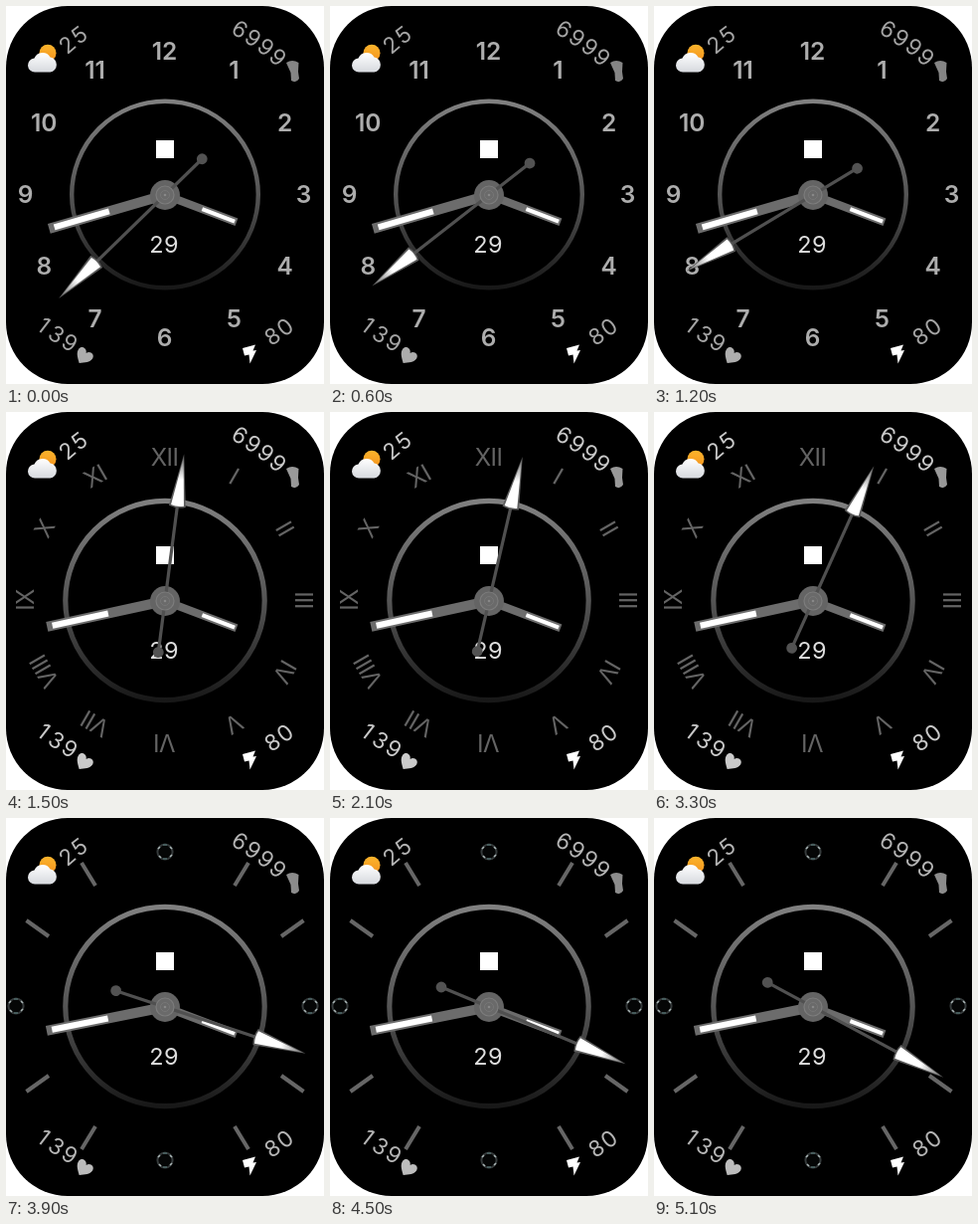
An HTML page for the animation above (5400 ms loop, 320x380 px).

```html
<!DOCTYPE html>
<html lang="en">
<head>
<meta charset="utf-8">
<title>Watch face</title>
<style>
html, body { margin: 0; width: 100%; height: 100%; overflow: hidden; background: #fff; }
svg { display: block; width: 100vw; height: 100vh; }
text { font-family: Inter, Roboto, sans-serif; text-anchor: middle; }
.arabic { font-size: 24.5px; font-weight: 600; fill: #adadad; }
.roman { font-size: 24px; font-weight: 400; fill: #646464; letter-spacing: -.6px; }
.thin { font-size: 22.5px; font-weight: 400; }
.date { font-size: 23.5px; font-weight: 400; fill: #dedede; letter-spacing: .5px; }
</style>
</head>
<body>
<svg viewBox="0 0 320 380">
  <defs>
    <linearGradient id="ringFade" x1="0" y1="0" x2="0" y2="1">
      <stop offset="0" stop-color="#808080"/>
      <stop offset=".5" stop-color="#555"/>
      <stop offset="1" stop-color="#181818"/>
    </linearGradient>
    <linearGradient id="cloud" x1="0" y1="0" x2="0" y2="1">
      <stop offset="0" stop-color="#fff"/>
      <stop offset="1" stop-color="#d6d9de"/>
    </linearGradient>
    <linearGradient id="sun" x1="0" y1="0" x2="0" y2="1">
      <stop offset="0" stop-color="#fbb52c"/>
      <stop offset="1" stop-color="#f3921e"/>
    </linearGradient>
    <linearGradient id="tip" x1="0" y1="0" x2="0" y2="1">
      <stop offset="0" stop-color="#777"/>
      <stop offset=".45" stop-color="#fff"/>
    </linearGradient>
    <g id="gem">
      <circle r="7.6" fill="#050606" stroke="#353a3b" stroke-width="2"/>
      <path d="M-7 -3l2 -2M5 -5l2 2M-6 4l2 2M5 5l2 -2" stroke="#a9b4b4" stroke-width="1.6"/>
      <path d="M-2 -7h4M-2 7h4" stroke="#4f6a6a" stroke-width="1.4"/>
    </g>
  </defs>

  <rect width="320" height="380" fill="#fff"/>
  <rect width="320" height="380" rx="62" fill="#000"/>

  <circle id="ring" cx="160" cy="189.500" fill="none" stroke="url(#ringFade)"/>
  <g id="dials"></g>

  <g id="corners"></g>
  <g>
    <circle cx="42" cy="47.300" r="8.500" fill="url(#sun)"/>
    <path d="M29.500 66.500a7 7 0 0 1-1-14a9 9 0 0 1 16-1a7.600 7.600 0 0 1 0 15z" fill="url(#cloud)"/>
  </g>
  <path id="foot" d="M282 57Q288 53 294.500 57L294 66L295 73Q292 78 287 75L286.500 67Z"/>
  <path id="heart" transform="translate(78.500 352) rotate(35) scale(.94)" d="M0 9C-5 5-9 2-9-3C-9-8-2-9 0-4C2-9 9-8 9-3C9 2 5 5 0 9Z"/>
  <path d="M238 344L251 340.500L248.500 346.500L252 346L245.500 359.500L244.500 350.500L240 351.500Z" fill="#fff"/>

  <rect x="151" y="135" width="18" height="18" fill="#fff"/>
  <text class="date" x="159.200" y="247.500">29</text>

  <g id="hour" transform="translate(160 190) rotate(110.800)">
    <rect x="-4" y="-77" width="8" height="77" fill="#6c6c6c"/>
    <rect x="-2" y="-75" width="4" height="35" fill="#fff"/>
  </g>
  <g id="minute">
    <rect x="-5" y="-121.500" width="10" height="121.500" fill="#6c6c6c"/>
    <rect x="-3" y="-116" width="6" height="57.500" fill="#fff"/>
  </g>
  <circle cx="160" cy="190" r="15" fill="#646464"/>
  <g id="second">
    <path d="M0 -98V52" stroke="#505050" stroke-width="3.200"/>
    <circle cy="52" r="5.400" fill="#525252"/>
    <path d="M0 -149L8.500 -96Q0 -93 -8.500 -96Z" fill="#5c5c5c"/>
    <path d="M0 -145L6.500 -97Q0 -95 -6.500 -97Z" fill="url(#tip)"/>
  </g>
  <g transform="translate(160 190)" fill="none">
    <circle r="9" fill="#6a6a6a" stroke="#7d7d7d" stroke-width="1.200"/>
    <circle r="4.500" stroke="#777"/>
    <circle r="1.300" fill="#888"/>
  </g>
</svg>
<script>
const STEP = 300, LOOP = 5400;
const $ = id => document.getElementById(id);
const at = (x, y, turn) => `translate(${x} ${y}) rotate(${turn})`;

// Each style: first step, ring, minute hand, corner shades, second-hand angle per step
const styles = [
  { from: 0, radius: 93.8, line: 4.4, minute: 253.8, text: '#a4a4a4', heart: '#adadad', foot: '#858585',
    seconds: [225.8, 229, 232.1, 235.6, 239] },
  { from: 5, radius: 100.2, line: 5.2, minute: 257.7, text: '#c8c8c8', heart: '#cacaca', foot: '#999',
    seconds: [7.4, 10.2, 13.1, 15.8, 18.6, 21.5, 24.3] },
  { from: 12, radius: 100.2, line: 5.2, minute: 258.7, text: '#b4b4b4', heart: '#bcbcbc', foot: '#8c8c8c',
    seconds: [106, 108.3, 110.5, 112.6, 115.5, 118.3] }
];

const romans = 'I II III IV V VI VII VIII IX X XI XII'.split(' ');

function numerals(kind, label, turns) {
  return romans.map((_, i) => {
    const a = (i + 1) * Math.PI / 6;
    const x = 159.5 + 140 * Math.sin(a), y = 189 - 144 * Math.cos(a);
    return `<text class="${kind}" y="8.8" transform="${at(x, y, turns ? (i + 1) * 30 : 0)}">${label(i)}</text>`;
  }).join('');
}

function bars() {
  const quarter = '<path d="M70 -121L84 -144M117 -70L139.5 -86"/>';
  const sides = [[1, 1], [-1, 1], [1, -1], [-1, -1]]
    .map(([x, y]) => `<g transform="translate(160 189) scale(${x} ${y})">${quarter}</g>`).join('');
  const gems = [[160, 34], [306, 189], [160, 344], [10, 189]]
    .map(([x, y]) => `<use href="#gem" x="${x}" y="${y}"/>`).join('');
  return `<g stroke="#666" stroke-width="4">${sides}</g>${gems}`;
}

// Digits spread along a shallow arc around (x, y)
function arcText(str, x, y, turn, bend) {
  const gap = 15.8, mid = (str.length - 1) / 2;
  return [...str].map((c, i) => {
    const swing = (i - mid) * gap / bend * 180 / Math.PI;
    return `<text class="thin" y="8" transform="${at(x, y, turn)} rotate(${swing} 0 ${bend})">${c}</text>`;
  }).join('');
}

$('dials').innerHTML = [
  numerals('arabic', i => i + 1, false),
  numerals('roman', i => romans[i], true),
  bars()
].map(dial => `<g>${dial}</g>`).join('');

$('corners').innerHTML =
  arcText('25', 67.5, 34, -39, 250) +
  arcText('6999', 255, 36.5, 36, 250) +
  arcText('139', 50.7, 330, 34, -250) +
  arcText('80', 274.5, 327.5, -36, -250);

function draw(ms) {
  const step = Math.floor(ms % LOOP / STEP);
  const n = step < 5 ? 0 : step < 12 ? 1 : 2;
  const s = styles[n];
  [...$('dials').children].forEach((g, i) => g.setAttribute('display', i === n ? 'inline' : 'none'));
  $('ring').setAttribute('r', s.radius);
  $('ring').setAttribute('stroke-width', s.line);
  $('corners').setAttribute('fill', s.text);
  $('heart').setAttribute('fill', s.heart);
  $('foot').setAttribute('fill', s.foot);
  $('minute').setAttribute('transform', at(160, 190, s.minute));
  $('second').setAttribute('transform', at(160, 190, s.seconds[step - s.from]));
}

const start = performance.now();
function tick() {
  draw(performance.now() - start);
  requestAnimationFrame(tick);
}
tick();
</script>
</body>
</html>
```
